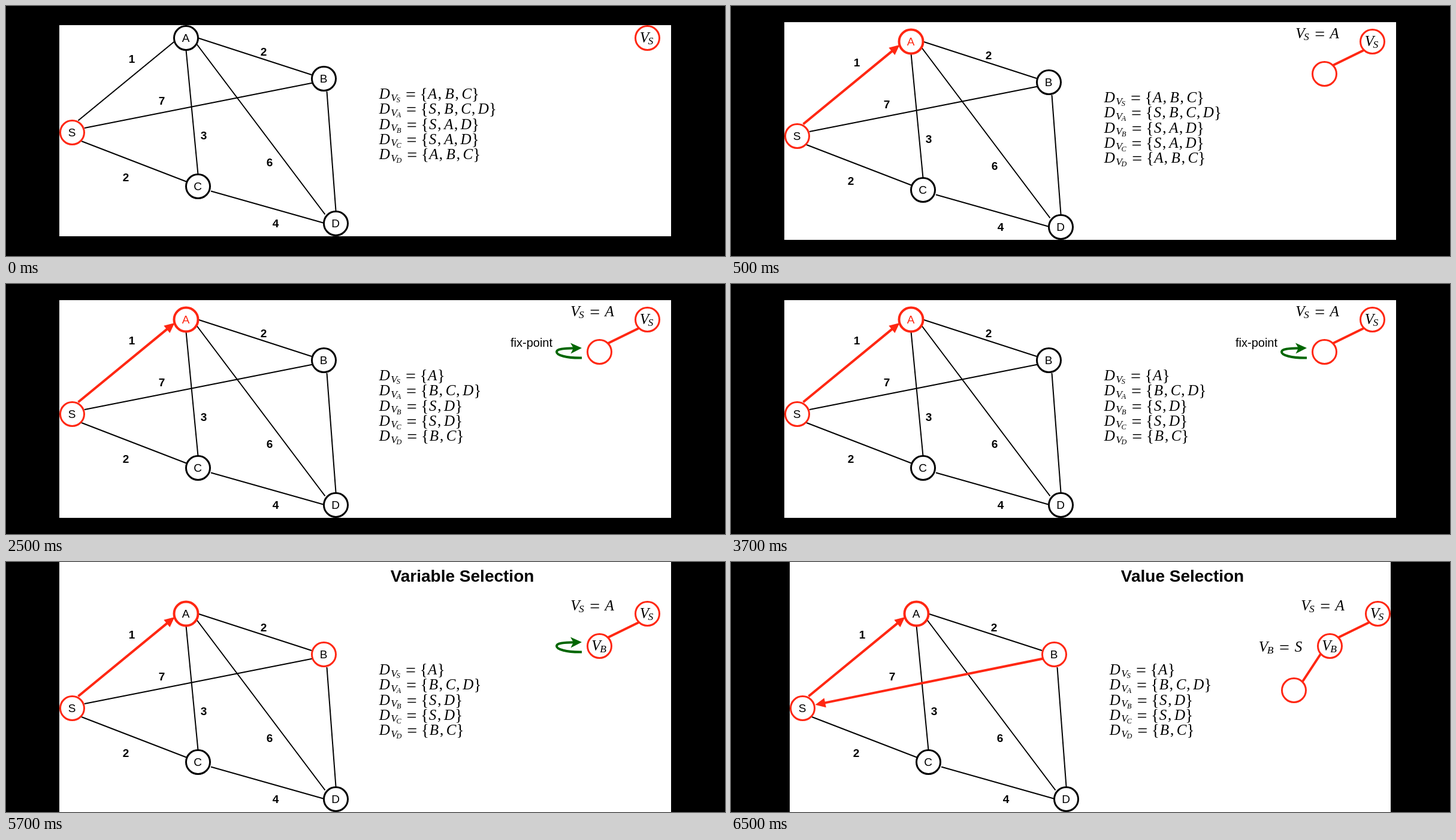
An HTML page with a canvas for the animation above (8 s loop, 1200x418 px).

```html
<!DOCTYPE html>
<html lang="en">
<head>
<meta charset="utf-8">
<title>Constraint search on a graph</title>
<style>
html, body { margin: 0; width: 100%; height: 100%; overflow: hidden; background: #000; }
canvas { display: block; }
</style>
</head>
<body>
<canvas id="stage" width="1200" height="418"></canvas>
<script>
const ctx = document.getElementById('stage').getContext('2d');
const RED = '#ff2712', GREEN = '#006600', BLACK = '#000';
const SANS = '"Liberation Sans", Arial, sans-serif';
const SERIF = '"Liberation Serif", Times, serif';
const EM = 23.2;

const nodes = { S: [110.5, 244.5], A: [300.5, 86.5], B: [530.5, 154.5], C: [320.5, 334.5], D: [550.5, 396.5] };
const edges = [
  [320.5, 86.5, 510, 148], [300.5, 106.5, 320.5, 314.5], [318.5, 97, 532.5, 381.5],
  [126, 259, 302, 327], [342, 342.5, 531, 396], [535.5, 176, 550.5, 375]
];
const edgeSA = [120.5, 224.5, 281.5, 92];
const edgeBS = [512, 161.5, 131.5, 238.8];
const weights = [['1', 210, 121], ['2', 430, 109], ['7', 260, 191], ['3', 330, 249], ['6', 440, 294], ['2', 200, 319], ['4', 450, 396]];

const full = { S: 'A,B,C', A: 'S,B,C,D', B: 'S,A,D', C: 'S,A,D', D: 'A,B,C' };
const pruned = { S: 'A', A: 'B,C,D', B: 'S,D', C: 'S,D', D: 'B,C' };

// Each step: start time, picture offset, white panel (x, y, w, h), search progress
const steps = [
  { at: 0, dx: 0, dy: -33, panel: [89, 32, 1021, 353], domains: full, depth: 0 },
  { at: 500, dx: 0, dy: -27, panel: [89, 27, 1021, 364], domains: full, depth: 1, hot: true },
  { at: 2500, dx: 0, dy: -27, panel: [89, 27, 1021, 364], domains: pruned, depth: 1, hot: true, loop: true, note: true },
  { at: 4500, dx: 0, dy: 0, panel: [89, 0, 1021, 418], domains: pruned, depth: 1, pickB: true, loop: true, title: 'Variable Selection' },
  { at: 6500, dx: 9, dy: 0, panel: [98, 0, 1003, 418], domains: pruned, depth: 2, pickB: true, title: 'Value Selection' }
];

function line([x1, y1, x2, y2], color = BLACK, width = 2) {
  ctx.strokeStyle = color;
  ctx.lineWidth = width;
  ctx.beginPath();
  ctx.moveTo(x1, y1);
  ctx.lineTo(x2, y2);
  ctx.stroke();
}

function polygon(points, color) {
  ctx.fillStyle = color;
  ctx.beginPath();
  points.forEach(([x, y]) => ctx.lineTo(x, y));
  ctx.fill();
}

function arrow([x1, y1, x2, y2]) {
  const angle = Math.atan2(y2 - y1, x2 - x1);
  const c = Math.cos(angle), s = Math.sin(angle);
  line([x1, y1, x2 - 12 * c, y2 - 12 * s], RED, 4);
  ctx.save();
  ctx.translate(x2, y2);
  ctx.rotate(angle);
  polygon([[0, 0], [-17, -8], [-17, 8]], RED);
  ctx.restore();
}

function circle(x, y, color, width = 3) {
  ctx.beginPath();
  ctx.arc(x, y, 20, 0, 2 * Math.PI);
  ctx.fillStyle = '#fff';
  ctx.fill();
  ctx.strokeStyle = color;
  ctx.lineWidth = width;
  ctx.stroke();
}

function label(text, x, y, size, color = BLACK, weight = '') {
  ctx.font = `${weight} ${size}px ${SANS}`;
  ctx.fillStyle = color;
  ctx.fillText(text, x, Math.round(y + size * 0.345));
}

// Formula typesetting: glyphs centred in cells measured in em
const cells = { A: 0.75, B: 0.8, C: 0.78, D: 0.85, S: 0.66, V: 0.583, ',': 0.445, '{': 0.5, '}': 0.5, '=': 1.37 };

function glyph(ch, x, y, em = EM) {
  const width = cells[ch] * em;
  const upright = '{}=,'.includes(ch);
  const size = em * (ch === '=' ? 1.3 : '{}'.includes(ch) ? 1.16 : 1.08);
  const shift = ch === 'V' ? 0.07 * em : ch === ',' ? -0.08 * em : 0;
  const drop = ch === '=' ? 3 : '{}'.includes(ch) ? 1 : 0;
  ctx.font = `${upright ? '' : 'italic'} ${size}px ${SERIF}`;
  ctx.fillStyle = BLACK;
  ctx.fillText(ch, x + width / 2 + shift, y + drop);
  return x + width;
}

function math(text, x, y) {
  for (const ch of text) x = glyph(ch, x, y);
  return x;
}

function variable(name, x, y, em = EM) {
  return glyph(name, glyph('V', x, y, em), y + 0.15 * em, em * 0.7) + 1;
}

function domain(name, values, row) {
  const y = 188 + row * 25.3;
  const x = variable(name, math('D', 622, y), y + 3.5, EM * 0.7);
  math(`={${values}}`, x, y);
}

function loopArrow() {
  ctx.strokeStyle = GREEN;
  ctx.lineWidth = 4;
  ctx.beginPath();
  ctx.moveTo(961, 150.5);
  ctx.bezierCurveTo(935, 151, 919, 146, 919, 140.5);
  ctx.bezierCurveTo(919, 136, 930, 134.5, 949, 134.2);
  ctx.stroke();
  polygon([[961, 134], [942.5, 143.5], [947, 134.3], [942, 125.5]], GREEN);
}

function drawGraph(step) {
  edges.forEach(e => line(e));
  step.depth > 0 ? arrow(edgeSA) : line(edgeSA);
  step.depth > 1 ? arrow(edgeBS) : line([131, 237, 512, 161.5]);
  for (const [name, [x, y]] of Object.entries(nodes)) {
    const red = name === 'S' || (name === 'A' && step.depth) || (name === 'B' && step.pickB);
    circle(x, y, red ? RED : BLACK, name === 'A' && step.depth ? 4 : 3);
    label(name, x - 0.5, y, 19, name === 'A' && step.hot ? RED : BLACK);
  }
  weights.forEach(([text, x, y]) => label(text, x, y, 19, BLACK, 'bold'));
}

function drawTree(step) {
  circle(1070.5, 86.5, RED);
  variable('S', 1057, 93.5);
  if (step.depth > 0) {
    line([1056, 101, 1004, 126.5], RED, 4);
    circle(990.5, 140.5, RED);
    math('=A', variable('S', 941.5, 81), 81);
  }
  if (step.pickB) variable('B', 976.5, 148);
  if (step.depth > 1) {
    line([975, 154, 944.5, 200.5], RED, 4);
    circle(930.5, 214.5, RED);
    math('=S', variable('B', 871, 150), 150);
  }
  if (step.loop) loopArrow();
  if (step.note) label('fix-point', 877, 125, 20);
}

function draw(step) {
  ctx.fillStyle = BLACK;
  ctx.fillRect(0, 0, 1200, 418);
  ctx.fillStyle = '#fff';
  ctx.fillRect(...step.panel);
  ctx.save();
  ctx.translate(step.dx, step.dy);
  ctx.textAlign = 'center';
  drawGraph(step);
  drawTree(step);
  Object.entries(step.domains).forEach(([name, values], row) => domain(name, values, row));
  if (step.title) label(step.title, step.depth > 1 ? 744.5 : 761.5, 23, 28, BLACK, 'bold');
  ctx.restore();
}

function tick(now) {
  const t = now % 8000;
  draw(steps.filter(s => s.at <= t).pop());
  requestAnimationFrame(tick);
}
tick(0);
</script>
</body>
</html>
```
